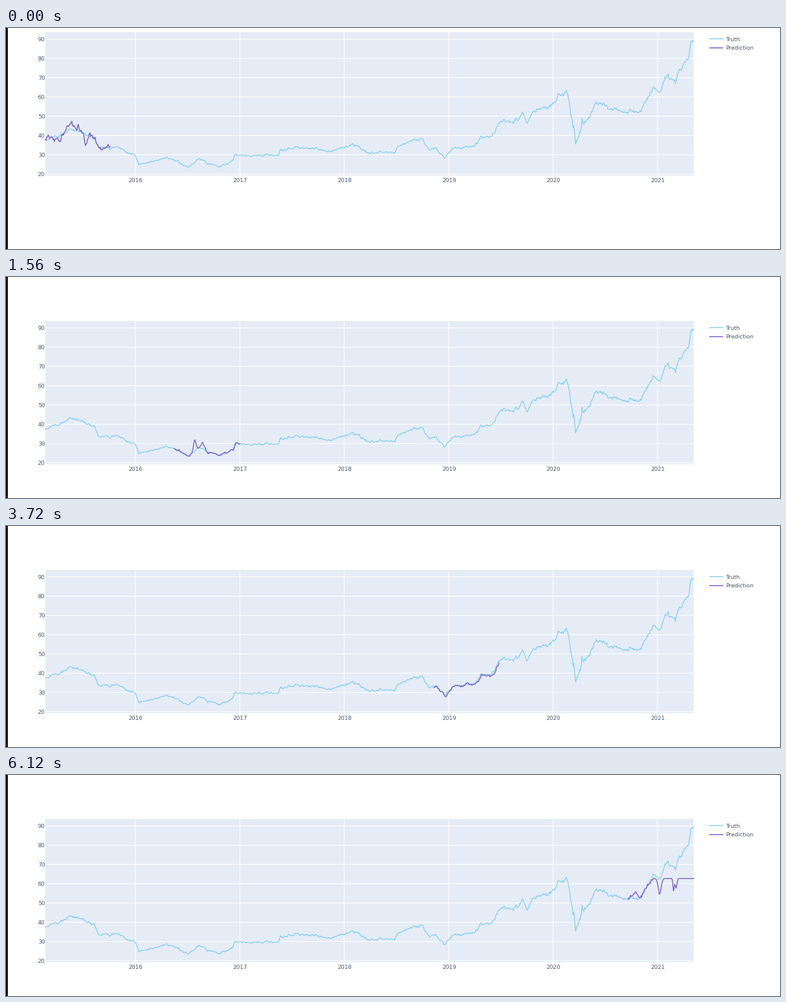
A matplotlib script that plays this animation: 1280x367 px, repeating every 6.15 s.

```python
import numpy as np
import matplotlib.pyplot as plt
from matplotlib.animation import FuncAnimation
from matplotlib.patches import Rectangle

W, H, DPI = 1280, 367, 100
INTERVAL, FRAMES = 30, 205
SCROLL_FRAME, HOLD, SCROLL = 16, 19, 66
LEFT, RIGHT, TOP, BOTTOM = 65, 1137, 73, 311
WINDOWS, CEILING = 10, 62.7
SKY, PURPLE, INK, PANEL = "#8fd1f3", "#7f62c9", "#4c5768", "#e5ecf6"
PX = 72 / DPI

plt.rcParams["font.family"] = "DejaVu Sans"

# Main turning points of the price: (pixel x, value)
TREND = [
    (65, 37.5), (106, 43.5), (146, 39), (153, 33.5), (186, 34), (214, 29.5),
    (220, 25), (265, 28.5), (301, 24), (320, 28), (352, 23.7), (374, 26.5),
    (378, 29.5), (451, 29.7), (454, 32.5), (483, 34), (540, 32), (573, 36),
    (600, 31.2), (643, 31.7), (648, 34.8), (686, 38.8), (701, 32), (710, 34),
    (726, 28.5), (740, 33), (780, 35), (785, 39.5), (802, 39.5), (818, 46.5),
    (846, 48), (854, 53), (863, 46), (872, 52.5), (900, 55), (915, 62),
    (927, 63), (942, 39), (976, 57.5), (1003, 53), (1047, 51.5), (1070, 64.5),
    (1081, 62.5), (1093, 70), (1107, 67.5), (1113, 74.5), (1129, 79.5),
    (1132, 88), (1137, 89.5),
]

# Where the forecast strays from the price: (pixel x, height, width)
MISSES = [(108, 2.5, 10), (131, -5, 2), (312, 6, 2), (325, 3, 2), (1040, 3, 3),
          (1081, -7.5, 2.5), (1104, -6.5, 1), (1108, -5, 1.5)]


def to_y(value):
    return 308.5 - (value - 20) * 3.2


def wobble(rng, count, memory=.7):
    """Mean-reverting noise of unit spread."""
    noise = rng.standard_normal(count)
    for i in range(1, count):
        noise[i] = memory * noise[i - 1] + np.sqrt(1 - memory ** 2) * noise[i]
    return noise


def bell(x, centre, width):
    return np.exp(-((x - centre) / width) ** 2 / 2)


def make_curves():
    rng = np.random.default_rng(7)
    x = np.linspace(LEFT, RIGHT, 1001)
    spread = .013 + .045 * bell(x, 945, 9)
    truth = np.interp(x, *zip(*TREND)) * (1 + spread * wobble(rng, len(x)))

    spread = np.interp(x, [LEFT, 250], [.03, .011])
    forecast = np.interp(x - 1.5, x, truth) * (1 + spread * wobble(rng, len(x)))
    forecast = np.minimum(forecast, CEILING)
    for centre, height, width in MISSES:
        forecast += height * bell(x, centre, width)
    return x, to_y(truth), to_y(forecast)


fig = plt.figure(figsize=(W / DPI, H / DPI), dpi=DPI, facecolor="white")
ax = fig.add_axes([0, 0, 1, 1])
ax.set_xlim(0, W)
ax.axis("off")


def stroke(x, y, color, width, **style):
    return ax.plot(x, y, color=color, lw=width * PX, solid_joinstyle="round", **style)[0]


def grid_line(x, y):
    stroke(x, y, "white", 1.4, alpha=.85, solid_capstyle="butt", snap=False)


def label(x, y, text, align):
    ax.text(x, y, text, color=INK, fontsize=9.3 * PX, ha=align, va="center_baseline")


ax.add_patch(Rectangle((0, 0), 3, H + SCROLL, color="black", lw=0))
ax.add_patch(Rectangle((LEFT, TOP), RIGHT - LEFT, BOTTOM - TOP, color=PANEL, lw=0))

for i in range(6):
    x = 214 + 172.7 * i
    grid_line([x, x], [TOP, BOTTOM])
    label(x + .5, 318.5, str(2016 + i), "center")
for value in range(20, 100, 10):
    y = to_y(value)
    grid_line([LEFT, RIGHT], [y, y])
    label(64.5, y + .5, str(value), "right")

for y, color, name in ((84, SKY, "Truth"), (99, PURPLE, "Prediction")):
    stroke([1163, 1186], [y, y], color, 1.6, solid_capstyle="butt")
    label(1190, y, name, "left")

curve_x, truth_y, forecast_y = make_curves()
stroke(curve_x, truth_y, SKY, 1.5)
forecast_line = stroke([], [], PURPLE, 1.5)


def update(frame):
    scroll = SCROLL if frame < SCROLL_FRAME else 0
    ax.set_ylim(H + scroll, scroll)
    window = int(np.clip((frame - SCROLL_FRAME) // HOLD + 1, 0, WINDOWS - 1))
    part = slice(window * 100 - (window > 0), window * 100 + 101)
    forecast_line.set_data(curve_x[part], forecast_y[part])
    return (forecast_line,)


anim = FuncAnimation(fig, update, frames=FRAMES, interval=INTERVAL, repeat=True,
                     repeat_delay=0, blit=False)
plt.show()
```
